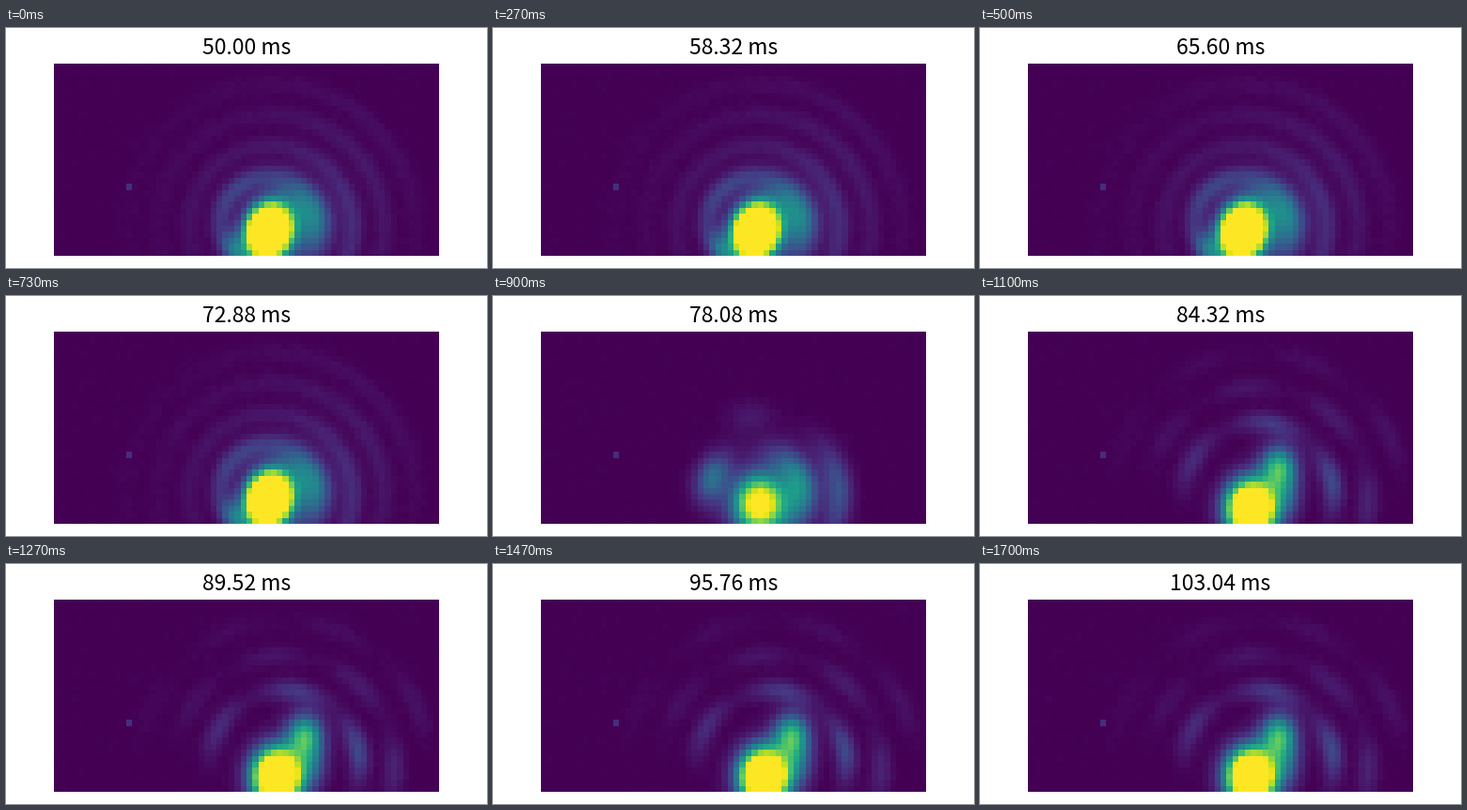
Write a matplotlib script that moves like this. It is 512 px wide and 256 px high and loops after 1730 ms.

```python
import numpy as np
import matplotlib.pyplot as plt
from matplotlib.animation import FuncAnimation

W, H, DPI = 512, 256, 100
COLS, ROWS, CELL = 64, 32, 6.4
LEFT, TOP = 51.2, 38.4
TICK, LOOP = 10, 1730          # ms
STEP = 1.04                    # shown ms per picture

X, Y = np.meshgrid(LEFT + CELL * (np.arange(COLS) + 0.5),
                   TOP + CELL * (np.arange(ROWS) + 0.5))


def blob(x, y, amp, sx, sy, tilt=0):
    """Gaussian spot in stage pixels; tilt in degrees, clockwise."""
    c, s = np.cos(np.radians(tilt)), np.sin(np.radians(tilt))
    u = (X - x) * c + (Y - y) * s
    v = (Y - y) * c - (X - x) * s
    return amp * np.exp(-0.5 * ((u / sx) ** 2 + (v / sy) ** 2))


def arc(radius, width, amp, bearing, spread, center=(282, 213)):
    """Soft arc around center; bearing in degrees, 0 up, clockwise."""
    dx, dy = X - center[0], Y - center[1]
    turn = np.degrees(np.arctan2(dx, -dy)) - bearing
    turn = (turn + 180) % 360 - 180
    off = (np.hypot(dx, dy) - radius) / width
    return amp * np.exp(-0.5 * (off ** 2 + (turn / spread) ** 2))


def ringed():
    """Saturated core, bright crescent and fading diffraction rings."""
    img = blob(280, 217, 3.0, 14.8, 18, 18)
    img += arc(46, 13, 0.46, 72, 40)
    img += arc(55, 8, 0.2, -45, 42)
    img += arc(46, 8, 0.33, -122, 18)
    for n in range(3):
        radius, peak = 87 + 33 * n, 0.13 / 2 ** n
        img += arc(radius, 8, 0.65 * peak, 85 - 20 * n, 40)
        img += arc(radius, 8, 0.4 * peak, 0, 130)
    return img


def switching():
    """Dim core between two side lobes."""
    img = blob(284, 222, 1.22, 19, 21)
    img += arc(46, 13, 0.48, 75, 38)
    img += arc(52, 12, 0.36, -69, 21)
    img += arc(86, 10, 0.26, 86, 24)
    img += arc(84, 12, 0.07, -6, 12)
    return img


def speckled():
    """Core with one lobe; the rings break up into petals."""
    img = blob(289, 227, 2.0, 17, 19.5)
    img += blob(318, 184, 0.68, 13, 16)
    img += blob(326, 214, 0.24, 11, 16)
    for n, (start, gap) in enumerate([(78, 69), (92, 49), (64, 43)]):
        for k in range(3 + (n > 0)):
            img += arc(80 + 37 * n, 8, 0.22 * 0.45 ** n * 0.75 ** k,
                       start - gap * k, gap / 4, (296, 215))
    return img


STATES = ringed(), switching(), speckled()
GRAIN = np.random.default_rng(4).normal(0, 0.003, X.shape)


def field(k):
    # quick switch through all three states around picture 27
    pos = np.interp(k, [25, 27, 29], [0, 1, 2])
    img = sum(s * max(0, 1 - abs(pos - n)) for n, s in enumerate(STATES))
    rng = np.random.default_rng(100 + k)
    img = img * (1 + rng.normal(0, 0.006))
    img += GRAIN + rng.normal(0, 0.0015, X.shape)
    img[20, 12] = 0.13         # stuck sensor pixel
    return img


fig = plt.figure(figsize=(W / DPI, H / DPI), dpi=DPI, facecolor="white")
ax = fig.add_axes([0.1, 0.05, 0.8, 0.8])
ax.axis("off")
image = ax.imshow(field(0), cmap="viridis", vmin=0, vmax=1,
                  interpolation="nearest")
title = fig.text(0.5, 1 - 28 / H, "", ha="center", va="baseline",
                 family="Noto Sans CJK JP", size=23 * 72 / DPI, color="black")


def update(i):
    k = (3 * i + 1) // 10      # 30 pictures a second on a 10 ms clock
    image.set_data(field(k))
    title.set_text(f"{50 + STEP * k:.2f} ms")
    return image, title


anim = FuncAnimation(fig, update, frames=LOOP // TICK, interval=TICK,
                     repeat=True, repeat_delay=0)
plt.show()
```
